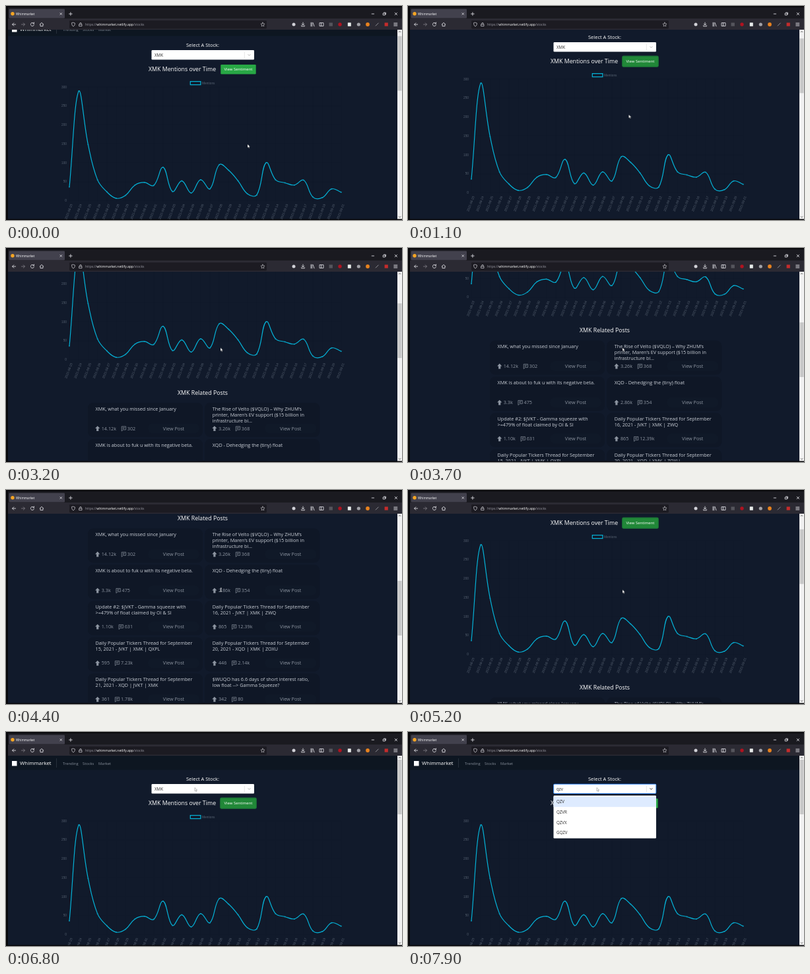
Animation, 600 px wide and 325 px high, one loop 8000 ms. Source, as an HTML page:

```html
<!DOCTYPE html>
<html lang="en">
<head>
<meta charset="utf-8">
<title>Whimmarket</title>
<style>
@property --scroll { syntax: "<number>"; inherits: true; initial-value: 0; }
html, body { margin: 0; width: 100%; height: 100%; overflow: hidden; background: #08080b; }
svg { display: block; width: 100vw; height: 100vh; animation: scroll 8s linear infinite; }
text { font-family: "Open Sans", "Noto Sans", sans-serif; fill: #fff; }
.mid { text-anchor: middle; }
.end { text-anchor: end; }
.tick { font-family: "Liberation Sans", Arial, sans-serif; font-size: 4.8px; fill: #566170; }
.head { font-size: 8.8px; }
.nav { font-size: 5.8px; fill: #858d98; }
.card { font-size: 7.25px; fill: #cbd0d8; }
.meta { font-size: 7.25px; fill: #8d95a1; }
.field { font-size: 6.2px; fill: #2b2b2b; }
.icon { fill: none; stroke: #d8d8de; stroke-width: .9; stroke-linecap: round; stroke-linejoin: round; }
.page { transform: translateY(calc(var(--scroll) * -1px)); }
.thumb { transform: translateY(calc(var(--scroll) * .305px)); }
.cursor { animation: move 8s linear infinite; }
.arrow, .beam, .focus, .open, .value, .key { animation: 8s step-end infinite; }
.arrow { animation-name: arrow; }
.beam { animation-name: beam; }
.focus { animation-name: focus; }
.open { animation-name: open; }
.value { animation-name: value; }
.k1 { animation-name: k1; }
.k2 { animation-name: k2; }
.k3 { animation-name: k3; }

@keyframes scroll {
  0%, 1.25% { --scroll: 12; }
  3.5%, 29.2% { --scroll: 24; }
  40%, 40.8% { --scroll: 138; }
  51%, 56.5% { --scroll: 314.6; }
  65%, 66% { --scroll: 58; }
  70%, 100% { --scroll: 0; }
}
@keyframes move {
  0%, 1.25% { transform: translate(366px, 210px); animation-timing-function: ease-in-out; }
  20%, 76% { transform: translate(325px, 151.5px); animation-timing-function: ease-in-out; }
  84%, 100% { transform: translate(286px, 84.5px); }
}
@keyframes arrow { 0% { opacity: 1; } 53% { opacity: 0; } 56.5% { opacity: 1; } }
@keyframes beam { 0% { opacity: 0; } 53% { opacity: 1; } 56.5% { opacity: 0; } }
@keyframes focus { 0% { opacity: 0; } 2% { opacity: 1; } 86% { opacity: 0; } }
@keyframes open { 0% { opacity: 0; } 86% { opacity: 1; } }
@keyframes value { 0% { opacity: 1; } 91.25% { opacity: 0; } }
@keyframes k1 { 0% { opacity: 0; } 91.25% { opacity: 1; } }
@keyframes k2 { 0% { opacity: 0; } 93.75% { opacity: 1; } }
@keyframes k3 { 0% { opacity: 0; } 96.25% { opacity: 1; } }
</style>
</head>
<body>
<svg viewBox="0 0 600 325">
  <defs>
    <clipPath id="view"><rect x="3" y="36" width="590" height="287.5"/></clipPath>
  </defs>

  <!-- page -->
  <g clip-path="url(#view)">
    <rect x="3" y="36" width="590" height="288" fill="#111a2b"/>
    <g class="page">
      <rect x="3" y="36" width="590" height="21.5" fill="#0d1621"/>
      <rect x="9" y="44" width="7.5" height="7.5" fill="#fff"/>
      <text x="21" y="50.4" font-size="7.9" font-weight="500">Whimmarket</text>
      <path d="M76.5 40v14" stroke="#39424e" stroke-width=".6"/>
      <text class="nav" x="86" y="50">Trending</text>
      <text class="nav" x="116" y="50">Stocks</text>
      <text class="nav" x="140" y="50">Market</text>

      <text class="mid" x="298" y="73.8" font-size="7.5">Select A Stock:</text>
      <text class="head" x="216" y="110.5">XMK Mentions over Time</text>
      <rect x="325.3" y="101" width="53.4" height="14.5" rx="1.3" fill="#28a745"/>
      <rect class="focus" x="324.8" y="100.2" width="54.4" height="16" rx="1.8" fill="#218838" stroke="#1c7a38" stroke-width="1.2"/>
      <text class="mid" x="352" y="110.4" font-size="5.95">View Sentiment</text>

      <g id="chart">
        <rect x="279.3" y="126.6" width="15.6" height="5" fill="none" stroke="#05b3d8" stroke-width="1.2"/>
        <text class="tick" x="297" y="130.8">Mentions</text>
      </g>

      <text class="head mid" x="298" y="360.6">XMK Related Posts</text>
      <g id="posts"></g>

      <g id="select">
        <rect x="220.5" y="79" width="155.5" height="14.6" rx="1.4" fill="#fff"/>
        <path d="M361.3 81.6v9.4" stroke="#ccc" stroke-width=".5"/>
        <path d="M366.6 85.4l1.9 1.9 1.9-1.9" fill="none" stroke="#b5b5b5"/>
        <text class="field value" x="225" y="88.6">XMK</text>
      </g>
      <g class="open" id="menu">
        <rect x="220.7" y="79.2" width="155.1" height="14.2" rx="1.4" fill="none" stroke="#2684ff" stroke-width=".9"/>
        <path d="M366.6 85.4l1.9 1.9 1.9-1.9" fill="none" stroke="#555"/>
        <rect x="220.5" y="96.5" width="155.5" height="65" rx="1.3" fill="#fff"/>
        <rect x="220.5" y="98.2" width="155.5" height="15.6" fill="#deebff"/>
      </g>
    </g>
  </g>

  <!-- scrollbar -->
  <rect x="593" y="36" width="7" height="287.5" fill="#f1f1f1"/>
  <rect class="thumb" x="593.4" y="42" width="6.2" height="83" fill="#c8c8c8"/>
  <path d="M595 40l1.6-1.8 1.6 1.8M595 319.4l1.6 1.8 1.6-1.8" fill="none" stroke="#555" stroke-width=".8"/>

  <!-- browser -->
  <rect x="3" y="2" width="597" height="17" fill="#1a1a20"/>
  <rect x="3" y="19" width="597" height="17" fill="#2b2a33"/>
  <rect x="4.5" y="4.5" width="84.5" height="14" rx="1.3" fill="#42414d"/>
  <circle cx="10" cy="11.8" r="2.7" fill="#f5a524"/>
  <text x="15" y="13.6" font-size="4.7">Whimmarket</text>
  <g class="icon">
    <path d="M82 10.6l2.6 2.6m0-2.6l-2.6 2.6M95.6 12h4.6m-2.3-2.3v4.6"/>
    <path d="M554.2 12h3.4M571.6 11h2.8v2.8h-2.8zM572.6 10h2.8v2.8M589.2 10.2l3.4 3.4m0-3.4l-3.4 3.4"/>
  </g>
  <rect x="96" y="22" width="299" height="12.4" rx="1.4" fill="#1c1b22"/>
  <g class="icon">
    <path d="M14.6 28H9.6m2.2-2.2L9.6 28l2.2 2.2"/>
    <path d="M23.5 28h5m-2.2-2.2l2.2 2.2-2.2 2.2" stroke="#7b7a82"/>
    <path d="M42.1 26.4a2.6 2.6 0 1 0 .4 2.2M42.5 25v1.8h-1.8"/>
    <path d="M51.2 28l2.8-2.7 2.8 2.7M52 27.6v3h4v-3"/>
    <path d="M102 25.2l2.4.8c0 2.6-.6 4-2.4 5-1.8-1-2.4-2.4-2.4-5z" stroke-width=".7"/>
    <path d="M111 27.8h4v2.8h-4zM111.8 27.6v-1a1.2 1.2 0 0 1 2.4 0v1" stroke-width=".7"/>
    <path d="M389 25l.9 1.9 2.1.3-1.5 1.5.3 2.1-1.8-1-1.8 1 .3-2.1-1.5-1.5 2.1-.3z" stroke-width=".6"/>
    <path d="M450 25v4m-1.8-1.8l1.8 1.8 1.8-1.8M447.6 29.6v1.2h4.8v-1.2"/>
    <path d="M462 25.2v5.6m1.7-5.6v5.6m1.4-5.4l1.9 5.4"/>
    <path d="M475.4 25.6h5.6v4.8h-5.6zM477.6 25.6v4.8"/>
    <path d="M560.2 30l4-4" stroke="#9a9aa2"/>
    <path d="M587.8 26h5m-5 2h5m-5 2h5"/>
  </g>
  <circle cx="436" cy="28" r="2.5" fill="#d0d0d6"/>
  <rect x="489.5" y="25.4" width="5.4" height="5.2" fill="#55555c"/>
  <circle cx="506" cy="28" r="2.7" fill="#b01320"/>
  <rect x="517.8" y="25.2" width="5" height="5.6" rx=".6" fill="#e8eceb"/>
  <circle cx="534.3" cy="28" r="2.6" fill="#a2a2a8"/>
  <circle cx="548" cy="28" r="2.9" fill="#e8821e"/>
  <rect x="573.6" y="25.4" width="5.2" height="5.2" fill="#c52c2c"/>
  <text x="120" y="29.9" font-size="5.06"><tspan fill="#9a9aa4">https://</tspan>whimmarket.netlify.app<tspan fill="#9a9aa4">/stocks</tspan></text>

  <g class="cursor">
    <path class="arrow" d="M0 0v5.2l1.2-1.1.9 1.9.9-.4-.9-1.8h1.7z" fill="#fff" stroke="#222" stroke-width=".3"/>
    <path class="beam" d="M-.4-2.2h2.4M.8-2.2v4.6M-.4 2.4h2.4" stroke="#fff" stroke-width=".8"/>
  </g>
</svg>
<script>
const NS = "http://www.w3.org/2000/svg";
const byId = id => document.getElementById(id);

function add(parent, tag, attrs, content = "") {
  const el = document.createElementNS(NS, tag);
  for (const name in attrs) el.setAttribute(name, attrs[name]);
  el.textContent = content;
  parent.append(el);
  return el;
}
const label = (parent, cls, x, y, content, extra) =>
  add(parent, "text", { class: cls, x, y, ...extra }, content);

function drawChart() {
  const chart = byId("chart");
  const mentions = [36, 289, 148, 55, 23, 6, 14, 41, 48, 40, 88, 24, 52, 20, 55, 31,
    95, 80, 52, 18, 15, 100, 55, 47, 41, 54, 9, 8, 31, 22];
  const zero = 307.5, unit = .575, left = 96, step = 14.2;
  const points = mentions.map((n, i) => [left + i * step, zero - n * unit]);
  const grid = d => add(chart, "path", { d, stroke: "#000", "stroke-opacity": .06, "stroke-width": .4 });

  for (let n = 0; n <= 300; n += 50) {
    const y = zero - n * unit;
    grid(`M93 ${y}H508`);
    label(chart, "tick end", 92, y + 1.5, n);
  }
  points.forEach(([x], i) => {
    grid(`M${x} 135V310`);
    const date = new Date(Date.UTC(2021, 7, 23 + i)).toISOString().slice(0, 10);
    label(chart, "tick end", 0, 1.5, date, { transform: `translate(${x + 3.4} 313) rotate(-69)` });
  });

  // Each handle follows the chord of its neighbours, scaled by segment length.
  const handle = (i, side) => {
    const [x, y] = points[i];
    const a = points[i - 1] || points[i], b = points[i + 1] || points[i];
    const before = Math.hypot(x - a[0], y - a[1]), after = Math.hypot(b[0] - x, b[1] - y);
    const k = side * .4 * (side > 0 ? after : before) / (before + after);
    const hy = y + k * (b[1] - a[1]);
    return [x + k * (b[0] - a[0]), Math.min(zero, Math.max(135, hy))];
  };
  let d = "M" + points[0];
  for (let i = 1; i < points.length; i++) d += `C${handle(i - 1, 1)} ${handle(i, -1)} ${points[i]}`;
  add(chart, "path", { d, fill: "none", stroke: "#05b3d8", "stroke-width": 1.2 });
  for (const [cx, cy] of points) add(chart, "circle", { cx, cy, r: 1, fill: "#0796b8" });
}

function drawPosts() {
  const posts = byId("posts");
  const daily = "Daily Popular Tickers Thread for September\n";
  const list = [
    ["XMK, what you missed since January", "14.12k", "302"],
    ["The Rise of Velto ($VQLO) – Why ZHUM’s\nprinter, Maren’s EV support ($15 billion in\ninfrastructure bi...", "3.26k", "368"],
    ["XMK is about to fuk u with its negative beta.", "3.3k", "475"],
    ["XQD - Dehedging the (tiny) float", "2.86k", "354"],
    ["Update #2: $JVKT - Gamma squeeze with\n>=479% of float claimed by OI & SI", "1.10k", "631"],
    [daily + "16, 2021 - JVKT | XMK | ZWQ", "865", "12.39k"],
    [daily + "15, 2021 - JVKT | XMK | QXPL", "595", "7.23k"],
    [daily + "20, 2021 - XQD | XMK | ZOXU", "446", "2.14k"],
    [daily + "21, 2021 - XQD | JVKT | XMK", "361", "1.78k"],
    ["$WUQO has 6.6 days of short interest ratio,\nlow float --> Gamma Squeeze?", "342", "80"]
  ];
  list.forEach(([title, votes, replies], i) => {
    const card = add(posts, "g", { transform: `translate(${124 + i % 2 * 177.2} ${373 + (i >> 1) * 55.1})` });
    add(card, "rect", { width: 174, height: 52, rx: 8, fill: "#0f1726" });
    title.split("\n").forEach((line, n) => label(card, "card", 11.5, 11.6 + n * 9, line));
    add(card, "path", { d: "M14.7 35.2l3.6 3.8h-2v4h-3.2v-4h-2z", fill: "#8d95a1" });
    const width = label(card, "meta", 20.7, 41.7, votes).getComputedTextLength();
    const x = 28.9 + width;
    add(card, "path", {
      d: `M${x} 36h6.4v5h-4l-2.4 2zM${x + 1.4} 37.8h3.6m-3.6 1.5h2.6`,
      fill: "none", stroke: "#8d95a1", "stroke-width": .7
    });
    label(card, "meta", x + 8.6, 41.7, replies);
    add(card, "rect", { x: 91, y: 31.5, width: 78, height: 15, rx: 7, fill: "#101928" });
    label(card, "meta mid", 130, 41.7, "View Post");
  });
}

function drawSelect() {
  let x = 225;
  [..."qzv"].forEach((letter, i) => {
    x += label(byId("select"), `field key k${i + 1}`, x, 88.6, letter).getComputedTextLength();
  });
  ["QZV", "QZVR", "QZVX", "GQZV"].forEach((name, i) =>
    label(byId("menu"), "field", 225, 108.3 + i * 15.6, name));
}

drawChart();
drawPosts();
drawSelect();
</script>
</body>
</html>
```
